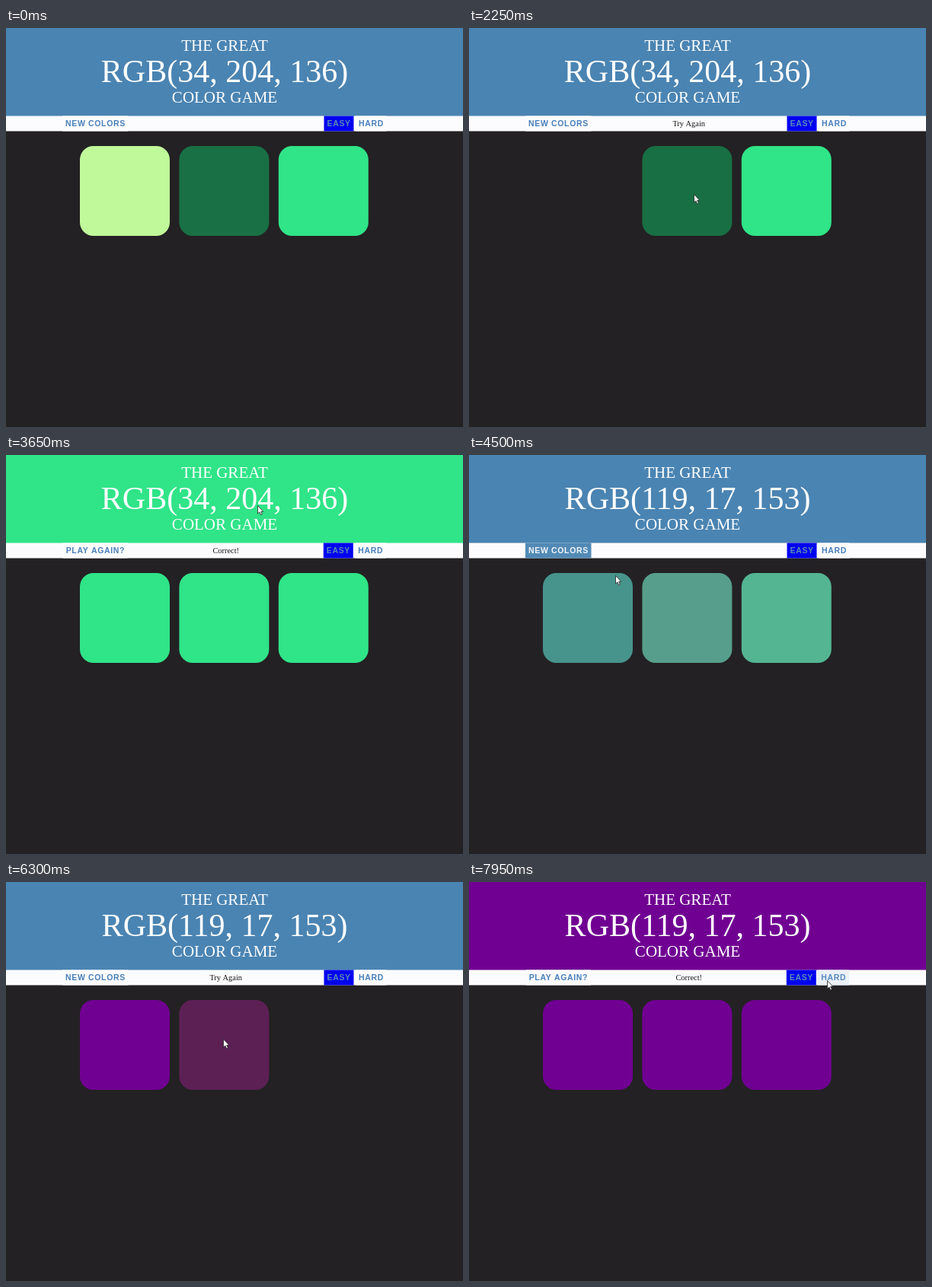
An HTML page with a canvas for the animation above (8000 ms loop, 600 px wide and 524 px high).

```html
<!DOCTYPE html>
<html lang="en">
<head>
<meta charset="utf-8">
<title>Color game</title>
<style>
html, body { margin: 0; width: 100%; height: 100%; overflow: hidden; background: #232123; }
canvas { display: block; }
</style>
</head>
<body>
<canvas id="stage" width="600" height="524"></canvas>
<script>
const ctx = document.getElementById('stage').getContext('2d');
const LOOP = 8000, FADE = 600, TRAVEL = 400;
const SERIF = '"Liberation Serif", "Times New Roman", serif';
const SANS = '"Liberation Sans", Arial, sans-serif';
const DARK = '#232123', BLUE = '#4a84b2', WHITE = '#fcfcfe', INK = '#487eba';

// misses: square index -> time of the wrong click
const rounds = [
  { start: 0, title: 'RGB(34, 204, 136)', colors: ['#c0f99a', '#187044', '#30e488'],
    misses: { 0: 1530, 1: 2230 }, answer: 2, win: 2885 },
  { start: 4365, title: 'RGB(119, 17, 153)', colors: ['#700092', '#a01e92', '#965ea8'],
    misses: { 2: 5060, 1: 6110 }, answer: 0, win: 6900 }
];

// Mouse stops: arrival time, x, y
const stops = [
  [50, 548, 286], [500, 108, 40], [900, 470, 60], [1200, 180, 215], [2050, 340, 75],
  [2250, 295, 218], [2850, 415, 224], [3650, 330, 66], [4050, 118, 121], [4400, 118, 122],
  [4500, 192, 158], [5000, 386, 221], [5600, 229, 207], [6300, 285, 206], [6750, 130, 212],
  [7950, 470, 129]
];

const rgb = hex => [1, 3, 5].map(i => parseInt(hex.slice(i, i + 2), 16));
const css = c => `rgb(${c.map(Math.round).join()})`;
const mix = (a, b, k) => a.map((v, i) => v + (b[i] - v) * k);
const clamp = x => Math.min(1, Math.max(0, x));

// CSS "ease": solve the curve's x for its parameter, then return y
function ease(x) {
  let lo = 0, hi = 1;
  for (let i = 0; i < 20; i++) {
    const s = (lo + hi) / 2;
    if (0.75 * s * (1 - s) + s ** 3 < x) lo = s; else hi = s;
  }
  return 0.3 * lo * (1 - lo) ** 2 + 3 * lo * lo * (1 - lo) + lo ** 3;
}

// Fade through [time, colour] changes, in order
function fade(color, changes, t) {
  return changes.reduce((c, [at, next]) => mix(c, rgb(next), ease(clamp((t - at) / FADE))), rgb(color));
}

function squareColor(i, t) {
  const changes = rounds.flatMap(r => [
    [r.start, r.colors[i]],
    [r.misses[i] ?? Infinity, DARK],
    [r.win, r.colors[r.answer]]
  ]).filter(c => c[0] <= t);
  return css(fade(rounds[0].colors[i], changes, t));
}

function box(color, x, y, w, h, r = 0) {
  ctx.fillStyle = color;
  ctx.beginPath();
  ctx.roundRect(x, y, w, h, r);
  ctx.fill();
}

function text(str, x, y, font, color, align = 'center', spacing = 0) {
  ctx.font = font;
  ctx.letterSpacing = spacing + 'px';
  ctx.textAlign = align;
  ctx.fillStyle = color;
  ctx.fillText(str, x, y);
}

function button(label, x, w, back, ink) {
  box(back, x, 115.6, w, 19.8);
  text(label, x + 4, 129.2, `bold 10.5px ${SANS}`, ink, 'left', 0.66);
}

function hoverButton(label, x, w, t, enter, leave) {
  const look = (off, on) => css(fade(off, [[enter, on], [leave, off]], t));
  button(label, x, w, look(WHITE, BLUE), look(INK, WHITE));
}

function cursor(t) {
  if (t < stops[0][0]) return;
  // Wait at the last stop, then travel to arrive on time
  const i = stops.findIndex(s => s[0] > t);
  const b = stops.at(i), a = i > 0 ? stops[i - 1] : b;
  const u = clamp(1 - (b[0] - t) / Math.min(TRAVEL, b[0] - a[0] || 1));
  const [, x, y] = mix(a, b, u * u * (3 - 2 * u));

  ctx.save();
  ctx.translate(Math.round(x) + 0.5, Math.round(y) + 0.5);
  const arrow = new Path2D('M0 0V10.6L2.4 8.4L4.1 12.3L5.9 11.5L4.2 7.8H7.3Z');
  ctx.fillStyle = '#fff';
  ctx.fill(arrow);
  ctx.strokeStyle = '#222';
  ctx.lineWidth = 0.8;
  ctx.stroke(arrow);
  ctx.restore();
}

function draw(t) {
  const round = rounds.findLast(r => r.start <= t);
  const won = t >= round.win;
  const missed = Object.values(round.misses).some(m => m <= t);
  const shift = won ? 0.7 : 0;

  box(DARK, 0, 0, 600, 524);
  box(won ? round.colors[round.answer] : BLUE, 0, 0, 600, 116);
  box(WHITE, 0, 115.6, 600, 19.8);

  text('THE GREAT', 287, 29.7, `21px ${SERIF}`, '#fff');
  text(round.title, 287, 71, `42px ${SERIF}`, '#fff');
  text('COLOR GAME', 287, 98.3, `21px ${SERIF}`, '#fff');

  hoverButton(won ? 'PLAY AGAIN?' : 'NEW COLORS', 74 + shift, 86.5 - 2 * shift, t, 4030, 4480);
  text(won ? 'Correct!' : missed ? 'Try Again' : '', 288.7, 129, `10.4px ${SERIF}`, '#141414');
  button('EASY', 417.5 - shift, 39, '#0000f0', '#588eb8');
  hoverButton('HARD', 459 - shift, 40.5, t, 7890, LOOP);

  for (let i = 0; i < 3; i++) box(squareColor(i, t), 97 + i * 130.4, 155, 118, 118, 17.7);
  cursor(t);
}

let start;
function tick(now) {
  start ??= now;
  draw((now - start) % LOOP);
  requestAnimationFrame(tick);
}
requestAnimationFrame(tick);
</script>
</body>
</html>
```
